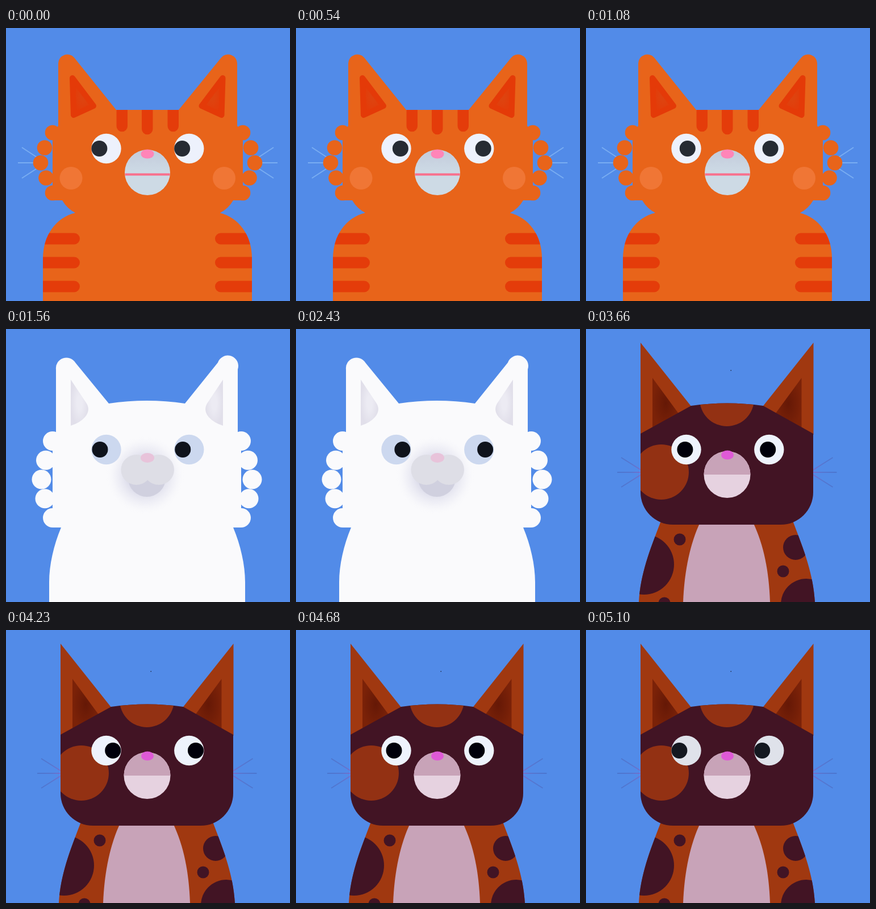
Animation, 500 px wide and 480 px high, one loop 5130 ms. Source, as an HTML page:

```html
<!DOCTYPE html>
<html lang="en">
<head>
<meta charset="utf-8">
<title>Three cats</title>
<style>
  html, body { margin: 0; width: 100%; height: 100%; overflow: hidden; background: #528be8; }
  svg { display: block; width: 500px; height: 480px; }
</style>
</head>
<body>
<svg viewBox="0 0 500 480">
  <defs>
    <radialGradient id="gingerEar"><stop offset=".2" stop-color="#de430f"/><stop offset="1" stop-color="#e43a08"/></radialGradient>
    <radialGradient id="whiteEar"><stop offset=".3" stop-color="#ecebf3"/><stop offset="1" stop-color="#e1dfea"/></radialGradient>
    <radialGradient id="calicoEar"><stop offset="0" stop-color="#651806"/><stop offset="1" stop-color="#7b2208"/></radialGradient>
    <radialGradient id="halo">
      <stop offset=".45" stop-color="#c9c9df" stop-opacity=".6"/>
      <stop offset=".75" stop-color="#d9d9ea" stop-opacity=".24"/>
      <stop offset="1" stop-color="#fafafc" stop-opacity="0"/>
    </radialGradient>
    <linearGradient id="muzzle" x2="0" y2="1">
      <stop offset="0" stop-color="#c3cbdb"/><stop offset=".5" stop-color="#cddae5"/>
    </linearGradient>
    <linearGradient id="whisker" gradientUnits="userSpaceOnUse" x1="55" y1="0" x2="97" y2="0">
      <stop offset="0" stop-color="#4a76cf"/><stop offset=".6" stop-color="#5676cf"/><stop offset="1" stop-color="#7a6ccb"/>
    </linearGradient>
    <path id="gingerTorso" d="M65 480V405C65 365 88 333 122 325H376C410 333 433 365 433 405V480Z"/>
    <path id="calicoTorso" d="M93 480C96 430 112 390 131 340H365C384 390 400 430 403 480Z"/>
    <path id="calicoHead" d="M96 184L185 135Q248 126 312 135L400 184V287A57 57 0 0 1 343 344H153A57 57 0 0 1 96 287Z"/>
    <clipPath id="gingerClip"><use href="#gingerTorso"/></clipPath>
    <clipPath id="torsoClip"><use href="#calicoTorso"/></clipPath>
    <clipPath id="headClip"><use href="#calicoHead"/></clipPath>
  </defs>
  <rect width="500" height="480" fill="#528be8"/>

  <g class="cat">
    <g id="gingerSide">
      <path d="M54 237H21M28 210L60 231M28 264L62 242" stroke="#79adf2" stroke-width="2"/>
      <g class="fluff" fill="#e8641a"></g>
    </g>
    <use href="#gingerSide" transform="matrix(-1 0 0 1 499 0)"/>
    <use href="#gingerTorso" fill="#e8641a"/>
    <path fill="#e8641a" d="M92 172V62A16 16 0 0 1 120 52L194 144H304L379 52A16 16 0 0 1 407 62V172L417 184V303H400Q392 317 377 325V340H122V325Q107 317 99 303H82V184Z"/>
    <path clip-path="url(#gingerClip)" stroke="#e43c0a" stroke-width="20" stroke-linecap="round" d="M50 370.5H120M50 412.5H120M50 454.5H120M378 370.5H450M378 412.5H450M378 454.5H450"/>
    <path fill="#e43c0a" d="M194.500 144h19.500v28.500a9.750 9.750 0 0 1-19.500 0zM239 144h19.500v33.500a9.750 9.750 0 0 1-19.500 0zM284.500 144h19.500v28.500a9.750 9.750 0 0 1-19.500 0z"/>
    <g id="gingerFace">
      <path d="M117 88L154 137L119 153Z" fill="url(#gingerEar)" stroke="#e43a08" stroke-width="10" stroke-linejoin="round"/>
      <circle cx="114.500" cy="264" r="20" fill="#f07635"/>
    </g>
    <use href="#gingerFace" transform="matrix(-1 0 0 1 498.500 0)"/>
    <circle cx="249" cy="254" r="40" fill="url(#muzzle)"/>
    <path d="M209.500 257.500H288.500" stroke="#f8708c" stroke-width="4"/>
    <ellipse cx="249" cy="221.500" rx="11.500" ry="8" fill="#ff85b8"/>
  </g>

  <g class="cat">
    <g id="whiteFluff" class="fluff" fill="#fafafc"></g>
    <use href="#whiteFluff" transform="matrix(-1 0 0 1 496 0)"/>
    <path fill="#fafafc" d="M76 480V445C76 415 84 380 97 349H82V185H88V71A18.500 18.500 0 0 1 122 59L181 131Q248 121 315 131L373 59A18.500 18.500 0 0 1 408 71V185H414V349H400C413 380 421 415 421 445V480Z"/>
    <path id="whiteInner" fill="url(#whiteEar)" d="M114 89L142 131Q149 143 139 155Q130 165 114 170Z"/>
    <use href="#whiteInner" transform="matrix(-1 0 0 1 496 0)"/>
    <circle cx="245" cy="257" r="70" fill="url(#halo)"/>
    <circle cx="248" cy="262" r="33" fill="#d0d0df"/>
    <ellipse cx="229.500" cy="247.500" rx="27" ry="26.500" fill="#dedee6"/>
    <ellipse cx="269" cy="247.500" rx="27" ry="26.500" fill="#dedee6"/>
    <ellipse cx="249" cy="226.500" rx="12" ry="8.500" fill="#e8c3da"/>
  </g>

  <g class="cat">
    <rect x="254.500" y="72" width="1.500" height="1.500" fill="#24304a"/>
    <use href="#calicoTorso" fill="#a03810"/>
    <g clip-path="url(#torsoClip)" fill="#421424">
      <circle cx="102" cy="414" r="53"/><circle cx="165" cy="370" r="10.500"/>
      <circle cx="138" cy="482" r="10.500"/><circle cx="369" cy="384" r="22"/>
      <circle cx="347" cy="426" r="10.500"/><circle cx="388" cy="484" r="45"/>
    </g>
    <path fill="#c8a3b8" d="M171 480C173 425 184 375 201 340H294C313 380 322 425 324 480Z"/>
    <g id="calicoSide">
      <path d="M96 24L186 137L96 186Z" fill="#a03810"/>
      <path d="M117 86L164 150L117 175Z" fill="url(#calicoEar)"/>
      <path d="M55 252L97 252.010M62 226L97 248M62 278L97 256" stroke="url(#whisker)" stroke-width="2"/>
    </g>
    <use href="#calicoSide" transform="matrix(-1 0 0 1 496.500 0)"/>
    <use href="#calicoHead" fill="#421424"/>
    <g clip-path="url(#headClip)" fill="#933113">
      <circle cx="248" cy="123" r="48"/><circle cx="132.500" cy="251.500" r="48.500"/>
    </g>
    <circle cx="248.500" cy="256" r="41" fill="#e6d2e0"/>
    <path d="M207.500 256a41 41 0 0 1 82 0z" fill="#c8a3b8"/>
    <ellipse cx="249" cy="221.500" rx="11" ry="8" fill="#df5ad6"/>
  </g>

  <g id="whites"><circle cx="176.500" cy="212" r="26.200"/><circle cx="322.300" cy="212" r="26.200"/></g>
  <g id="pupils"><circle cx="164.300" cy="212" r="14"/><circle cx="310.100" cy="212" r="14"/></g>
</svg>
<script>
  const LOOP = 5130, LOOK = LOOP / 3, REACH = 24, FADE = 60;
  // end time, eye white, pupil, then the two colours the eyes fade to before the cut
  const CATS = [
    { end: 1540, white: [237, 241, 252], pupil: [38, 43, 51] },
    { end: 3360, white: [204, 216, 239], pupil: [15, 19, 28], lastWhite: [221, 229, 243], lastPupil: [16, 19, 28] },
    { end: LOOP, white: [238, 243, 252], pupil: [0, 0, 10], lastWhite: [223, 226, 234], lastPupil: [20, 24, 32] }
  ];
  const FLUFF = [
    { r: 13.3, top: 184, step: 26.5, xs: [82, 68, 61, 70.5, 82] },
    { r: 17, top: 197, step: 33.75, xs: [82, 70, 62.5, 68.5, 82] }
  ];
  const groups = [...document.querySelectorAll('.cat')];
  const whites = document.getElementById('whites');
  const pupils = document.getElementById('pupils');

  document.querySelectorAll('.fluff').forEach((g, i) => {
    const { r, top, step, xs } = FLUFF[i];
    g.innerHTML = xs.map((x, n) => `<circle cx="${x}" cy="${top + n * step}" r="${r}"/>`).join('');
  });

  // cubic-bezier(0, 0, .58, 1)
  function easeOut(x) {
    let lo = 0, hi = 1;
    for (let i = 0; i < 20; i++) {
      const u = (lo + hi) / 2;
      if (1.74 * (1 - u) * u * u + u ** 3 < x) lo = u; else hi = u;
    }
    return 3 * (1 - lo) * lo * lo + lo ** 3;
  }

  function mix(a, b, k) {
    return `rgb(${a.map((v, i) => Math.round(v + ((b || a)[i] - v) * k))})`;
  }

  function draw(t) {
    const index = CATS.findIndex(c => t < c.end);
    const cat = CATS[index];
    groups.forEach((g, i) => g.style.display = i === index ? '' : 'none');

    const half = (t % LOOK) / LOOK * 2;
    const shift = half < 1 ? easeOut(half) : 1 - easeOut(half - 1);
    pupils.setAttribute('transform', `translate(${shift * REACH} 0)`);

    const fade = Math.min(1, Math.max(0, (t - cat.end + FADE) / (FADE / 2)));
    whites.setAttribute('fill', mix(cat.white, cat.lastWhite, fade));
    pupils.setAttribute('fill', mix(cat.pupil, cat.lastPupil, fade));
  }

  const start = performance.now();
  function tick() {
    draw((performance.now() - start) % LOOP);
    requestAnimationFrame(tick);
  }
  tick();
</script>
</body>
</html>
```
